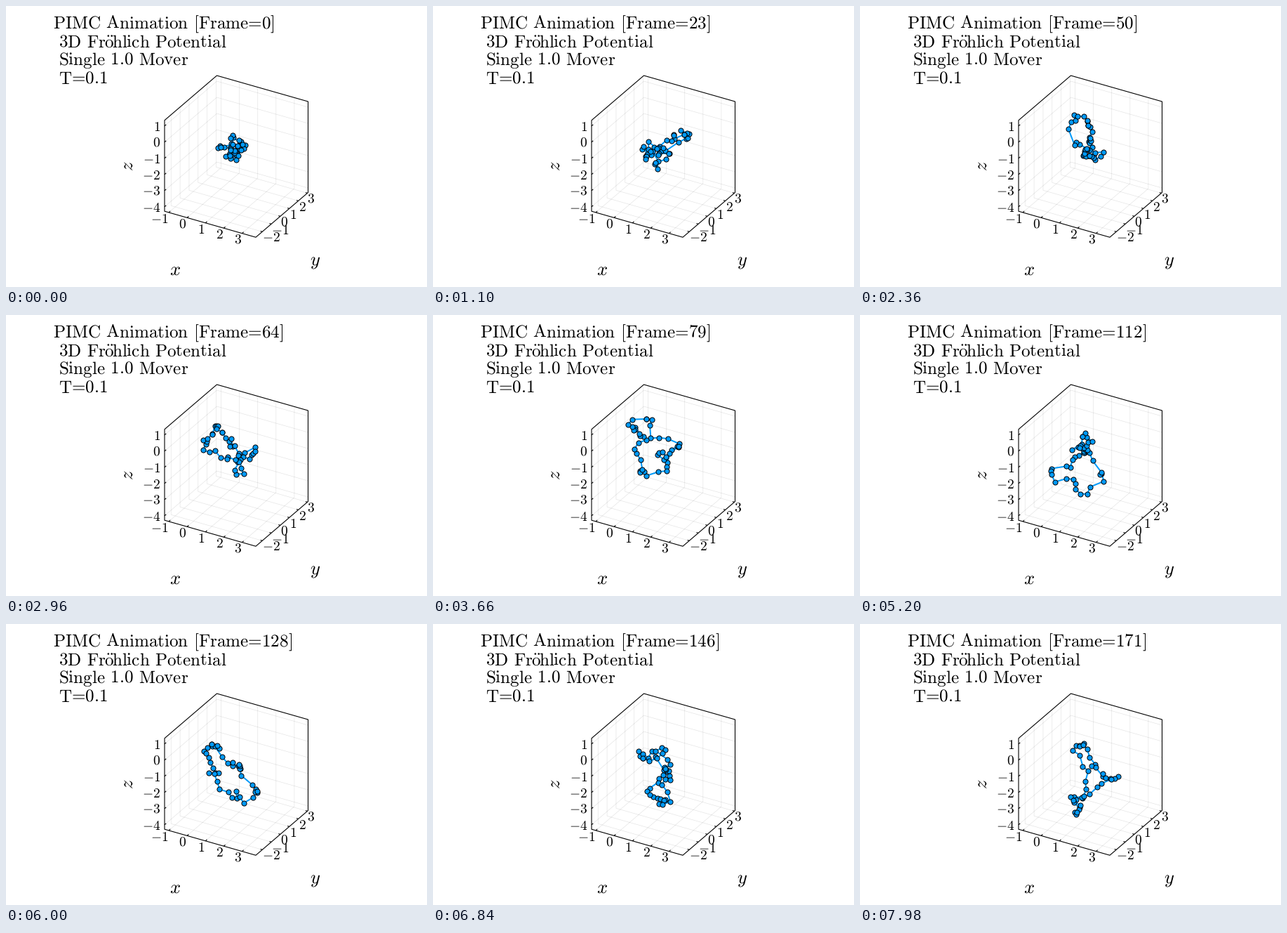
Write a matplotlib script that moves like this. It is 600 px wide and 400 px high and loops after 8000 ms.

```python
import numpy as np
import matplotlib.pyplot as plt
from matplotlib.animation import FuncAnimation
from matplotlib.collections import LineCollection

plt.rcParams["mathtext.fontset"] = "cm"
plt.rcParams["text.hinting"] = "none"

W, H, DPI = 600, 400, 100
PX = 72 / DPI
BLUE = "#009afa"
TICK_MS = 20

# Screen geometry of the box: corner of the three minima, and one edge per axis
CORNER = np.array([226.0, 292.2])
EDGES = {"x": np.array([130.0, 37.0]),
         "y": np.array([74.5, -63.7]),
         "z": np.array([0.0, -129.5])}
RANGE = {"x": (-1.23, 3.75), "y": (-2.72, 3.08), "z": (-4.28, 1.35)}
TICKS = {"x": range(-1, 4), "y": range(-2, 4), "z": range(-4, 2)}

STEPS = 172
BEADS = 40
MODES = 19
SPREAD = np.array([12.5, 9.5])

# Drift of the ring: step, centre x, centre y, half distance between its lobes
DRIFT = np.array([(0, 325, 203, 9), (23, 328, 202, 8), (50, 323, 194, 14),
                  (79, 312, 188, 22), (112, 314, 208, 25),
                  (146, 322, 214, 35), (171, 324, 222, 36)])


def simulate(seed=11):
    """Closed Brownian ring whose modes fluctuate, short waves fastest."""
    rng = np.random.default_rng(seed)
    k = np.arange(1, MODES + 1)
    angle = 2 * np.pi * np.outer(np.arange(BEADS), k) / BEADS
    basis = np.hstack([np.cos(angle), np.sin(angle)])
    size = np.tile(1 / k, 2)[:, None] * SPREAD
    keep = np.exp(-np.tile(k, 2) / 15)[:, None]
    lobe = -np.cos(angle[:, 0])

    amp = rng.normal(size=size.shape)
    path = []
    for step in range(STEPS):
        cx, cy, half = (np.interp(step, DRIFT[:, 0], c) for c in DRIFT.T[1:])
        pts = basis @ (amp * size) + (cx, cy)
        pts[:, 1] += half * lobe
        path.append(pts)
        kick = rng.normal(size=size.shape)
        amp = keep * amp + np.sqrt(1 - keep ** 2) * kick
    return path


beads = simulate()


def roman(s):
    """Upright Computer Modern with text spacing."""
    s = s.replace(" ", r"\hspace{0.38}")
    s = s.replace("=", r"\hspace{-0.2}=\hspace{-0.2}")
    s = s.replace("ö", r"\hspace{-0.04}\ddot{o}\hspace{-0.08}")
    return rf"$\mathrm{{{s}}}$"


fig = plt.figure(figsize=(W / DPI, H / DPI), dpi=DPI, facecolor="white")
ax = fig.add_axes([0, 0, 1, 1])
ax.set_xlim(0, W)
ax.set_ylim(H, 0)
ax.axis("off")


def label(x, y, s, size, ha="left", va="baseline", **kw):
    return ax.text(x, y, s, fontsize=size * PX, color="black",
                   ha=ha, va=va, **kw)


ex, ey, ez = EDGES["x"], EDGES["y"], EDGES["z"]

# Per axis: start, two edges spanning the grid, tick direction, label offset
LAYOUT = {"x": (CORNER, ey, ez, 0.03 * ey, (-1, 14.8), "right"),
          "y": (CORNER, ex, ez, -0.02 * ex, (0, 14.2), "left"),
          "z": (CORNER, ey, ex, 0.03 * ey, (-6, 7.3), "right")}

grid, marks = [], []
for name, (start, side, far, tick, shift, ha) in LAYOUT.items():
    lo, hi = RANGE[name]
    for v in TICKS[name]:
        p = start + EDGES[name] * (v - lo) / (hi - lo)
        if name == "y":
            grid.append([p + side, p, p + far])
            p = p + ex
        else:
            grid.append([p, p + side, p + side + far])
        marks.append([p, p + tick])
        label(*(p + shift), roman(str(v)), 19.5, ha)

outline = [CORNER + ez, CORNER, CORNER + ex, CORNER + ex + ey,
           CORNER + ex + ey + ez, CORNER + ey + ez, CORNER + ez]
ax.add_collection(LineCollection(grid, colors=[(0, 0, 0, 0.1)],
                                 linewidths=0.7 * PX, zorder=1))
ax.add_collection(LineCollection([outline] + marks, colors="black",
                                 linewidths=1.1 * PX, zorder=2))

label(241, 383, "$x$", 26.5, "center")
label(441, 369.5, "$y$", 26.5, "center")
label(173.5, 228, "$z$", 26.5, "center", "center", rotation=90)

title = label(66.7, 32.3, "", 25.1)
for i, s in enumerate(["3D Fröhlich Potential", "Single 1.0 Mover", "T=0.1"]):
    label(75, 58.3 + 25.9 * i, roman(s), 25.1)

chain, = ax.plot([], [], color=BLUE, lw=2 * PX, marker="o", ms=7.1 * PX,
                 mfc=BLUE, mec="black", mew=1.0 * PX, zorder=3)


def step_at(tick):
    """Steps last 20, 100 and 20 ms in turn."""
    group, part = divmod(tick, 7)
    return 3 * group + (part > 0) + (part > 5)


def draw(tick):
    step = step_at(tick)
    pts = beads[step]
    chain.set_data(*np.vstack([pts, pts[:1]]).T)
    title.set_text(roman(f"PIMC Animation [Frame={step}]"))
    return chain, title


anim = FuncAnimation(fig, draw, frames=400, interval=TICK_MS,
                     repeat=True, repeat_delay=0)
plt.show()
```
